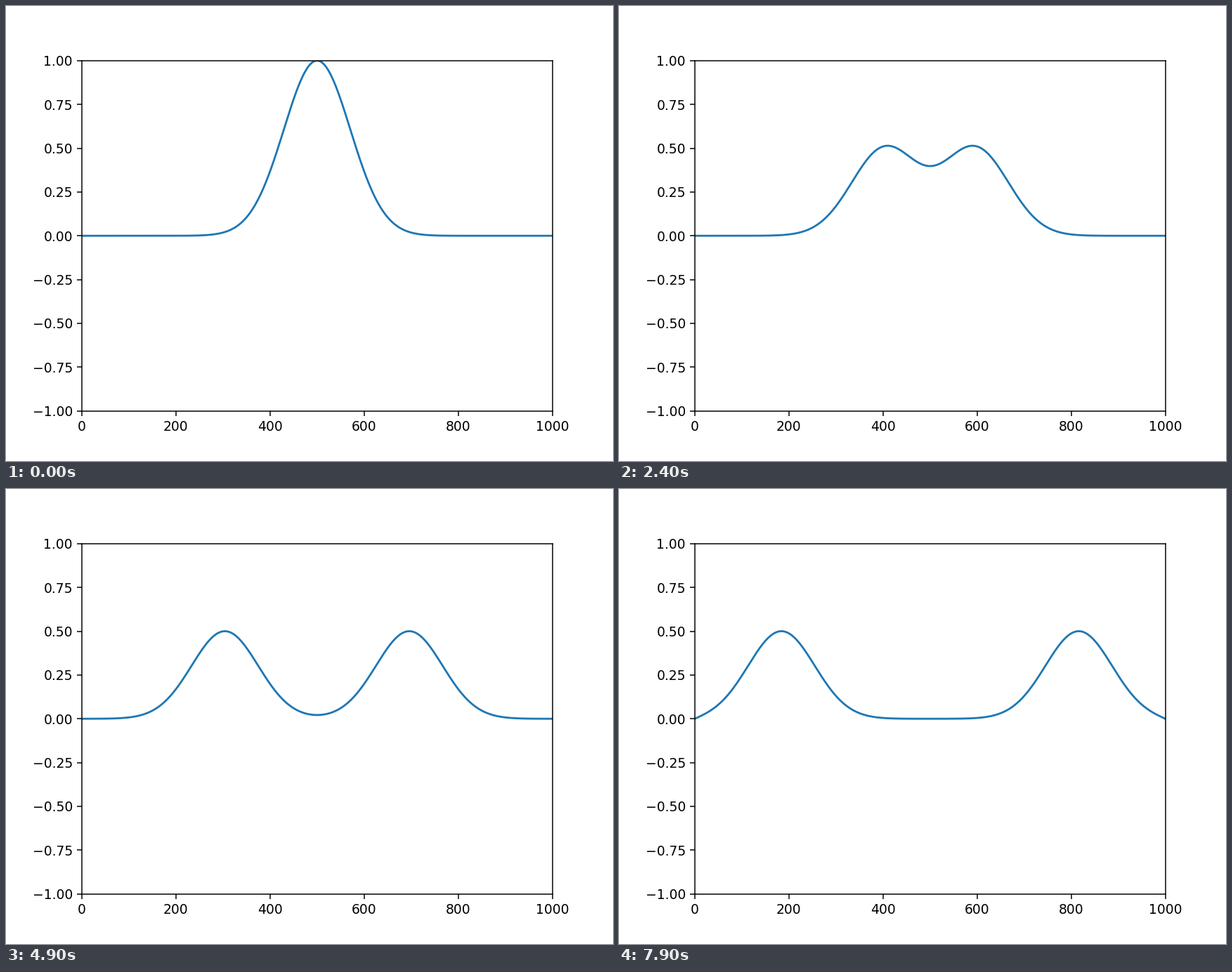
Write a matplotlib script that moves like this. It is 864 px wide and 648 px high and loops after 8 s.

```python
import numpy as np
import matplotlib.pyplot as plt
from matplotlib.animation import FuncAnimation

FRAMES, INTERVAL = 80, 100
LENGTH, CENTER, WIDTH = 1000, 500, 100
SPEED = 4  # grid units per frame

x = np.arange(LENGTH + 1)


def pulse(pos):
    return np.exp(-((pos - CENTER) / WIDTH) ** 2)


def string(pos):
    """Odd extension of the pulse, so both ends stay fixed."""
    return pulse(pos) - pulse(-pos) - pulse(2 * LENGTH - pos)


def wave(frame):
    shift = SPEED * frame
    return (string(x - shift) + string(x + shift)) / 2


fig, ax = plt.subplots(figsize=(6.4, 4.8), dpi=135)
ax.set(xlim=(0, LENGTH), ylim=(-1, 1))
line, = ax.plot(x, wave(0))


def update(frame):
    line.set_ydata(wave(frame))
    return line,


anim = FuncAnimation(fig, update, frames=FRAMES, interval=INTERVAL,
                     repeat=True, repeat_delay=0)
plt.show()
```
